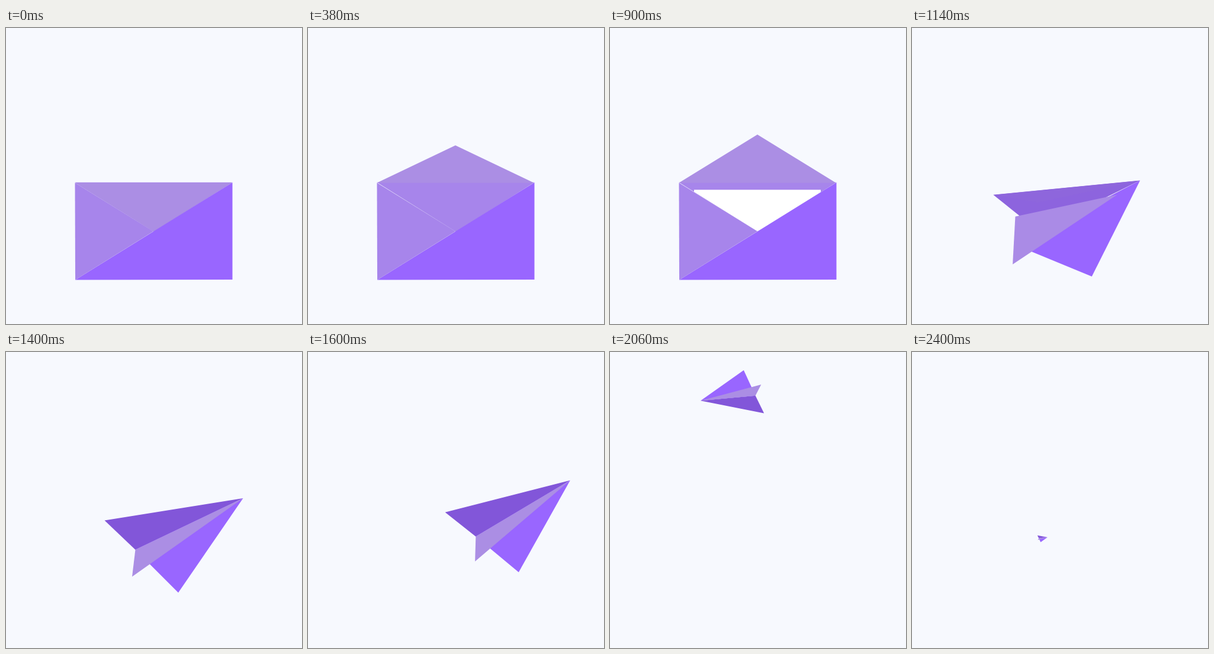
An HTML page with a canvas that plays this animation: 500 px wide and 500 px high, repeating every 2420 ms.

```html
<!DOCTYPE html>
<html lang="en">
<head>
<meta charset="utf-8">
<title>Envelope to paper plane</title>
<style>
  html, body { margin: 0; width: 100%; height: 100%; overflow: hidden; background: #f7f9fe; }
  canvas { display: block; width: 100vmin; height: 100vmin; }
</style>
</head>
<body>
<canvas id="stage" width="500" height="500"></canvas>
<script>
const ctx = document.getElementById('stage').getContext('2d');
const LOOP = 2420, STEP = 20;

const PAGE = [247, 249, 254], WHITE = [255, 255, 255];
const LIGHT = [171, 142, 228], SIDE = [167, 133, 235], BRIGHT = [153, 102, 255], DARK = [130, 86, 217];

// Envelope corners
const TL = [116.5, 261.5], TR = [382.5, 261], BL = [117, 425.5], BR = [382.5, 425], MID = [249, 343.5];

// Plane corners, relative to its centre
const NOSE = [80.5, -51], WING_L = [-153.5, -13.5], WING_R = [-29, 108.5], FOLD = [-101.5, 36], TAIL = [-107, 81.5];

// Flight key points: time, x, y, rotation in degrees, scale
const FLIGHT = [
  [1260, 303, 307, 1, 1.025],
  [1400, 320, 298, 0, 1],
  [1760, 418, 190, -28.9, 0.81],
  [1800, 426, 155, -40, 0.775],
  [1880, 386, 97, -86, 0.67],
  [2060, 196, 73, -159.7, 0.461],
  [2220, 41, 202, -237, 0.255],
  [2340, 161, 307, -314, 0.125],
  [2400, 222, 314.5, -340, 0.073]
];

const lerp = (a, b, k) => a + (b - a) * k;
const mix = (p, q, k) => p.map((v, i) => lerp(v, q[i], k));
const progress = (t, from, to) => Math.min(1, Math.max(0, (t - from) / (to - from)));
const smooth = k => k * k * (3 - 2 * k);

// Smooth cubic through the flight keys
function flightPose(t) {
  const last = FLIGHT.length - 1;
  const rate = (n, c) => {
    const i = Math.min(last - 1, Math.max(0, n)), p = FLIGHT[i], q = FLIGHT[i + 1];
    return (q[c] - p[c]) / (q[0] - p[0]);
  };
  const slope = (n, c) => {
    if (n === 0 || n === last) return rate(n, c);
    const [before, now, after] = FLIGHT.slice(n - 1, n + 2).map(key => key[0]);
    return lerp(rate(n - 1, c), rate(n, c), progress(now, before, after));
  };
  let i = 0;
  while (i < last - 1 && t >= FLIGHT[i + 1][0]) i++;
  const a = FLIGHT[i], b = FLIGHT[i + 1], k = progress(t, a[0], b[0]);
  return [1, 2, 3, 4].map(c =>
    lerp(a[c], b[c], smooth(k)) +
    (b[0] - a[0]) * k * (1 - k) * ((1 - k) * slope(i, c) - k * slope(i + 1, c)));
}

function trace(points) {
  ctx.beginPath();
  points.forEach(p => ctx.lineTo(...p));
  ctx.closePath();
}

function fill(points, color) {
  trace(points);
  ctx.fillStyle = `rgb(${color.map(Math.round)})`;
  ctx.fill();
}

const box = (x, y, w, h) => [[x, y], [x + w, y], [x + w, y + h], [x, y + h]];

function draw(t) {
  const [x, y, degrees, scale] = flightPose(t);
  const angle = degrees * Math.PI / 180;
  const cos = Math.cos(angle) * scale, sin = Math.sin(angle) * scale;
  const place = ([px, py]) => [x + px * cos - py * sin, y + px * sin + py * cos];

  const fold = smooth(progress(t, 960, 1240));
  const morph = (from, to) => from.map((p, i) => mix(p, place(to[i]), fold));
  const open = 1 - (1 - progress(t, 60, 540)) ** 2;
  const apex = [249, lerp(343.5, 180, open)];

  fill(box(0, 0, 500, 500), PAGE);

  if (fold < 1) {
    // Reaches a little under its neighbours so that no gap shows
    const back = morph([[116.5, 260.8], [382.5, 260.8], [250, 344.2]], [WING_L, NOSE, FOLD]);
    fill(back, mix(SIDE, DARK, fold));
    const rise = smooth(progress(t, 700, 940)) * (1 - fold);
    ctx.save();
    trace(back);
    ctx.clip();
    fill(box(142, lerp(350, 267, rise), 214, 100), WHITE);
    ctx.restore();
  }
  fill(morph([TL, [381.5, 261.5], apex], [WING_L, NOSE, FOLD]), mix(LIGHT, DARK, fold));
  fill(morph([BL, TR, BR], [FOLD, NOSE, WING_R]), BRIGHT);
  fill(morph([TL, MID, BL], [FOLD, NOSE, TAIL]), mix(SIDE, LIGHT, fold));
}

const start = performance.now();
function tick() {
  const t = (performance.now() - start) % LOOP;
  draw(Math.floor(t / STEP) * STEP);
  requestAnimationFrame(tick);
}
tick();
</script>
</body>
</html>
```
